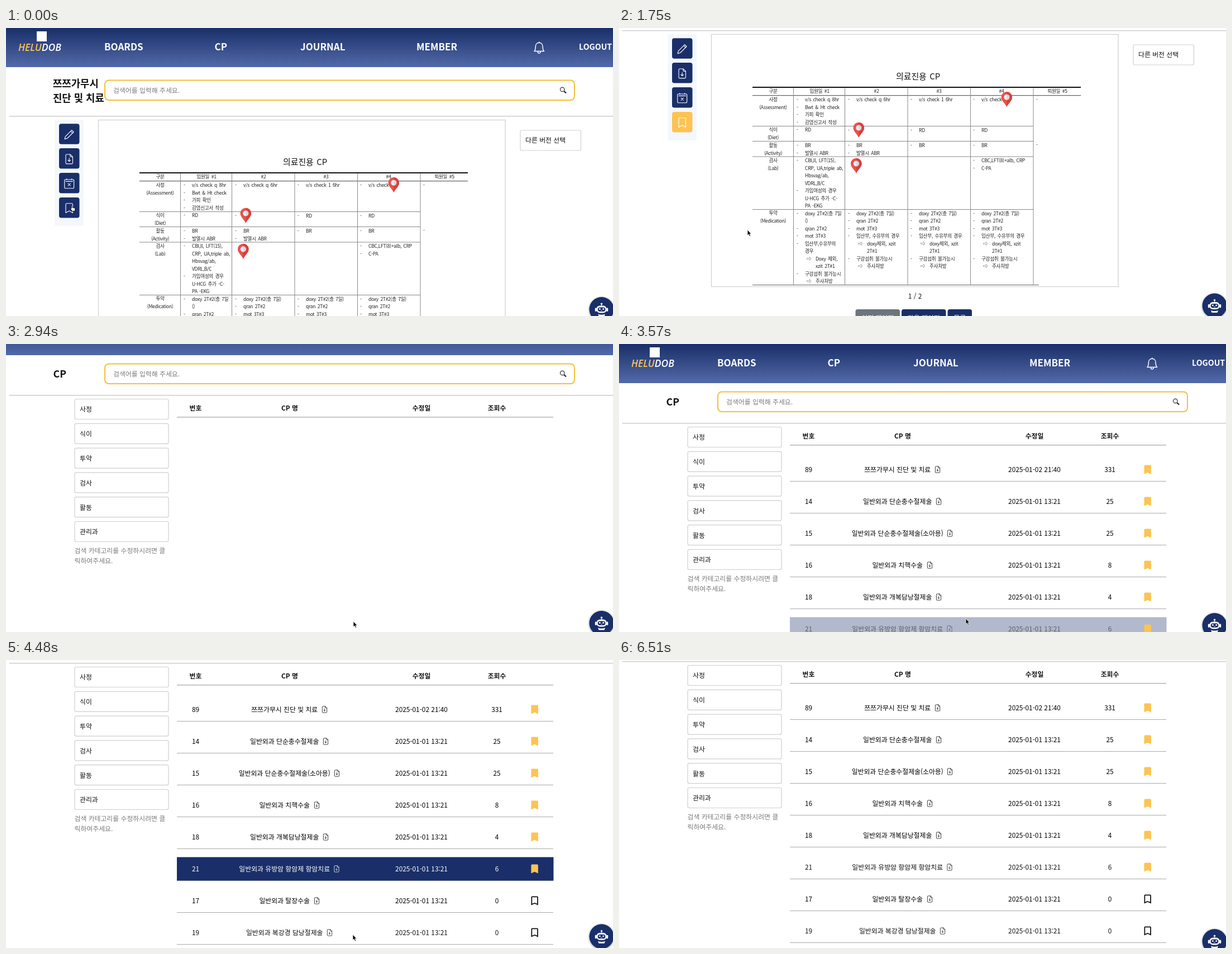
Animation, 1087 px wide and 515 px high, one loop 7 s. Source, as an HTML page:

```html
<!DOCTYPE html>
<html lang="ko">
<head>
<meta charset="utf-8">
<title>CP</title>
<style>
  html, body { margin: 0; width: 100%; height: 100%; overflow: hidden; background: #fff; }
  svg { display: block; width: 100vw; height: 100vh; }
  text { font-family: "Noto Sans CJK KR", "Noto Sans CJK", "Noto Sans CJK JP", sans-serif; font-feature-settings: "calt" 0; fill: #111; }
  .mid { text-anchor: middle; }
  .bold { font-weight: 700; }
  .med { font-weight: 500; }
  .white { fill: #fff; }
  .soft { fill: #7b7b7b; }
  .title { word-spacing: 1.2px; }
  .doc text { letter-spacing: -.038em; word-spacing: 1.5px; fill: #222; }
  .row text { fill: currentColor; }
  .icon { fill: none; stroke-linecap: round; stroke-linejoin: round; }
  .brand { font: italic 600 17.5px "Open Sans", sans-serif; }
  .box { fill: #fff; stroke: #cfcfcf; stroke-width: 1.2; }
  #bot { filter: drop-shadow(0 1px 2px #0006); }
</style>
</head>
<body>
<svg id="stage" viewBox="0 0 1087 515"></svg>
<script>
const NAVY = '#1a2f69', YELLOW = '#fdc353', SIZE = 11.86, SMALL = 8.6, STEP = 13.5;
const ICONS = {
  pencil: 'M.8 15.2 2 11 12 1l3 3L5 14zM10.3 2.7l3 3',
  file: 'M9.5.5H4A1.5 1.5 0 0 0 2.5 2v12A1.5 1.5 0 0 0 4 15.5h8a1.5 1.5 0 0 0 1.5-1.5V4.5zV3A1.5 1.5 0 0 0 11 4.5h2.5M8 6.5v5M6 9.7l2 2 2-2',
  calendar: 'M2 1.5h12A1.5 1.5 0 0 1 15.5 3v11a1.5 1.5 0 0 1-1.5 1.5H2A1.5 1.5 0 0 1 .5 14V3A1.5 1.5 0 0 1 2 1.5zM2.5 4.5h11M4 .3v1.5M12 .3v1.5M6.2 7.8l3.6 3.6M9.8 7.8l-3.6 3.6',
  bookmark: 'M2.5 15.3V2A1.5 1.5 0 0 1 4 .5h8A1.5 1.5 0 0 1 13.5 2v13.3L8 12.3z'
};

const text = (x, mid, s, cls = '', size = SIZE) =>
  `<text x="${x}" y="${mid + size * .37}" font-size="${size}" class="${cls}">${s.replace(/&/g, '&amp;')}</text>`;
const rect = (x, y, w, h, fill, r = 0, more = '') =>
  `<rect x="${x}" y="${y}" width="${w}" height="${h}" rx="${r}" fill="${fill}" ${more}/>`;
const box = (x, y, w, h, r = 3) => rect(x, y, w, h, '#fff', r, 'class="box"');
const line = (x1, y1, x2, y2, color, w = 1) =>
  `<path d="M${x1} ${y1}L${x2} ${y2}" stroke="${color}" stroke-width="${w}"/>`;
const icon = (name, x, y, size, color = '#fff') =>
  `<path class="icon" d="${ICONS[name]}" stroke="${color}" transform="translate(${x - size / 2} ${y - size / 2}) scale(${size / 16})"/>`;

function header() {
  return rect(0, 0, 1087, 70, 'url(#sky)') + rect(55, 6, 18, 18, '#fff') +
    `<text class="brand" x="22" y="41" style="fill:${YELLOW}">HELU<tspan fill="#fff">DOB</tspan></text>` +
    [[176, 'BOARDS'], [373.5, 'CP'], [527, 'JOURNAL'], [735, 'MEMBER']]
      .map(([x, s]) => text(x, 34, s, 'bold white', 17)).join('') +
    text(1026, 34, 'LOGOUT', 'bold white', 14.2) +
    '<path class="icon" stroke="#fff" stroke-width="1.5" d="M946 41.5c2-2 2.3-4 2.3-8 0-4.5 2.7-7.2 6.4-7.2s6.4 2.7 6.4 7.2c0 4 .3 6 2.5 8zM952.3 42.5a2.5 2.5 0 0 0 5 0M954.7 25v1"/>';
}

function search(y, ruleY) {
  const m = y + 17.7;
  return rect(177, y, 841, 35.5, '#fff', 7, 'stroke="#f4bf3a" stroke-width="2"') +
    text(192, m, '검색어를 입력해 주세요.', 'soft') +
    `<circle cx="996.3" cy="${m - 1.3}" r="3.8" fill="#eef2f4" stroke="#333" stroke-width="1.2"/>` +
    line(999.3, m + 1.8, 1003, m + 5.2, '#222', 2.2) + line(6, ruleY, 1087, ruleY, '#cdcdcd', 1.4);
}

// A leading "-" sets a bullet, ">" an arrow, "_" the arrow's indent.
function cell(x, y, lines) {
  return lines.map((s, i) => {
    const put = (dx, str) => text(x + dx, y + i * STEP, str, '', SMALL);
    const rest = s.slice(1);
    if (s[0] === '-') return put(-15, '-') + put(0, rest);
    if (s[0] === '>') return put(3, '⇨') + put(19, rest);
    return s[0] === '_' ? put(19, rest) : put(0, s);
  }).join('');
}

const pin = (x, y) => `<g transform="translate(${x} ${y})">
  <path d="M0 0C-1.8-5.5-9.8-11-9.8-17.6a9.8 9.6 0 0 1 19.6 0C9.8-11 1.8-5.5 0 0z" fill="#ec504b"/>
  <path d="M0 0C1.8-5.5 9.8-11 9.8-17.6A9.8 9.6 0 0 0 0-27.2z" fill="#d9403d"/>
  <circle cy="-17.5" r="5" fill="#f1f1f1"/><path d="M0-22.5a5 5 0 0 1 0 10z" fill="#d3dbe0"/></g>`;

function chart() {
  const heads = [[276, '구분'], [359, '입원일 #1'], [461, '#2'], [573, '#3'], [685, '#4'], [785, '퇴원일 #5']];
  const labels = [[281.3, '사정', '(Assessment)'], [335.3, '식이', '(Diet)'], [363, '활동', '(Activity)'],
    [390.3, '검사', '(Lab)'], [484.3, '투약', '(Medication)']];
  const dose = ['-doxy 2T#2(총 7일)', '-qran 2T#2', '-mot 3T#3', '-임산부, 수유부의 경우', '>doxy제외, xzit',
    '_2T#1', '-구강섭취 불가능시', '>주사처방'];
  const checks = ['-v/s check q 6hr', '-v/s check 1 6hr', '-v/s check'];
  return text(496, 239, '의료진용 CP', 'title', 14.9) + '<g class="doc">' +
    heads.map(([x, s]) => text(x, 266.3, s, 'mid', SMALL)).join('') +
    labels.map(([y, a, b]) => text(276, y, a, 'mid', SMALL) + text(276, y + 13.7, b, 'mid', SMALL)).join('') +
    [328.5, 355.5, 383, 477.5].map(y => line(239, y, 742, y, '#888')).join('') +
    line(239, 612.5, 752, 612.5, '#666', 1.2) + line(239, 273.7, 827, 273.7, '#666', 1.3) +
    [312.5, 404.5, 517, 629.5, 742].map(x => line(x, 259, x, 612.5, '#888')).join('') +
    line(239, 259, 827, 259, '#111', 2) +
    cell(333, 281.3, ['-v/s check q 8hr', '-Bwt & Ht check', '-가피 확인', '-감염신고서 작성', '-RD']) +
    cell(333, 363, ['-BR', '-발열시 ABR', '-CBI,II, LFT(15),', 'CRP, UA,triple ab,', 'Hbsvag/ab,', 'VDRL,B/C',
      '-가임여성의 경우', 'U-HCG 추가 -C-', 'PA -EKG', '-doxy 2T#2(총 7일', '()', '-qran 2T#2', '-mot 3T#3',
      '-임산부,수유부의', '경우', '>Doxy 제외,', '_xzit 2T#1', '-구강섭취 불가능시', '>주사처방']) +
    [425, 537, 649].map((x, i) => cell(x, 281.3, [checks[i]]) +
      cell(x, 335.7, [i ? '-RD' : '-']) + cell(x, 363, ['-BR']) + cell(x, 484.6, dose)).join('') +
    cell(425, 376.5, ['-발열시 ABR']) + cell(649, 390.3, ['-CBC,LFT(8)+alb, CRP', '-C-PA']) +
    cell(762, 281.3, ['-']) + cell(762, 362, ['-']) +
    pin(694.3, 294.3) + pin(429.3, 349) + pin(424.8, 413) + '</g>';
}

function detailPage() {
  const tools = ['pencil', 'file', 'calendar', 'bookmark'];
  const buttons = [[423.5, 79.5, '이전 페이지', '#6c757d'], [506, 79.5, '다음 페이지', NAVY], [588.5, 43.5, '목록', NAVY]];
  return header() + text(84, 99, '쯔쯔가무시', 'bold', 17.8) + text(84, 125, '진단 및 치료', 'bold', 17.8) +
    search(93.5, 157.7) + rect(87.5, 164, 51.5, 190, '#f4f8fc') +
    tools.map((n, i) => rect(95, 171.2 + i * 43.9, 36.5, 36.5, NAVY, 4, `id="${n}"`) +
      icon(n, 113.2, 190.5 + i * 43.9, 18)).join('') +
    box(165.5, 164.5, 728.5, 451, 0) + chart() +
    box(921, 183, 108.5, 36) + text(930, 201, '다른 버전 선택', 'med') +
    text(530, 633, '1 / 2', 'mid') +
    buttons.map(([x, w, s, c]) => rect(x, 656, w, 33, c, 4) + text(x + w / 2, 672, s, 'mid med white')).join('');
}

const ROWS = [
  ['89', '쯔쯔가무시 진단 및 치료', 570.5, '331'], ['14', '일반외과 단순충수절제술', 572.5, '25'],
  ['15', '일반외과 단순충수절제술(소아용)', 592.5, '25'], ['16', '일반외과 치핵수술', 556.5, '8'],
  ['18', '일반외과 개복담낭절제술', 572.5, '4'], ['21', '일반외과 유방암 항암제 항암치료', 592, '6'],
  ['17', '일반외과 탈장수술', 556.5, '0'], ['19', '일반외과 복강경 담낭절제술', 579.5, '0']
];

function row([no, name, iconX, views], i) {
  const y = 224.5 + i * 57, saved = i < 6;
  return `<g class="row">${line(306, y + 21, 980, y + 21, '#aaa', 1.2)}` +
    rect(306, y - 21, 674.5, 42, NAVY, 0, 'opacity="0"') +
    text(339.5, y, no, 'mid') + text(498.7, y, name, 'mid') + icon('file', iconX, y, 12, 'currentColor') +
    text(744, y, i ? '2025-01-01 13:21' : '2025-01-02 21:40', 'mid') + text(879, y, views, 'mid') +
    `<path transform="translate(936 ${y - 10.7}) scale(.89)" fill="${saved ? YELLOW : '#111'}" d="M17 3H7c-1.1 0-2 .9-2 2v16l7-3 7 3V5c0-1.1-.9-2-2-2z${saved ? '' : 'm0 15-5-2.18L7 18V5h10z'}"/></g>`;
}

function listPage() {
  return header() + text(84.5, 103.8, 'CP', 'bold', 17.8) + search(85.5, 141.8) +
    ['사정', '식이', '투약', '검사', '활동', '관리과'].map((s, i) =>
      box(123, 148.5 + i * 43.8, 168, 36) + text(132, 167 + i * 43.8, s, 'med')).join('') +
    text(122.5, 420, '검색 카테고리를 수정하시려면 클', 'soft') + text(122.5, 437.5, '릭하여주세요.', 'soft') +
    [[339.5, '번호'], [508, 'CP 명'], [744, '수정일'], [879, '조회수']]
      .map(([x, s]) => text(x, 165, s, 'mid bold')).join('') +
    line(306, 180.7, 980, 180.7, '#b5b5b5', 1.4) + `<g id="rows">${ROWS.map(row).join('')}</g>`;
}

const bot = `<g id="bot"><circle cx="1066.5" cy="503" r="22" fill="${NAVY}"/>
  <g fill="#fff"><circle cx="1066.5" cy="493.3" r="1.7"/><path d="M1066 494h1v4h-1z"/>
  <rect x="1054.8" y="500.5" width="3" height="6.5" rx="1.4"/><rect x="1075.2" y="500.5" width="3" height="6.5" rx="1.4"/>
  <rect x="1057.5" y="496.5" width="18" height="13" rx="6"/><path d="M1060 511.5q6.5 2.5 13 0l-1.5 4h-10z"/></g>
  <rect x="1059.7" y="499.5" width="13.6" height="7.5" rx="3.7" fill="${NAVY}"/>
  <circle cx="1063.3" cy="502.5" r="1.4" fill="#fff"/><circle cx="1069.7" cy="502.5" r="1.4" fill="#fff"/>
  <path d="M1065 504.8q1.5 1.2 3 0" fill="none" stroke="#fff" stroke-width=".8"/></g>`;

const pointer = `<g id="pointer">
  <path id="arrow" d="M0 0V9.8L2.2 7.9 3.9 11.6 5.6 10.8 4 7.2H6.9z" fill="#000" stroke="#fff" stroke-width=".8"/>
  <path id="hand" d="M1 .6C1.5-.2 2.6 0 2.7 1V4l3.8.8q1.5.4 1.3 2L7.2 10.5H2.7L-.6 6.6q-.3-1.3 1.6-.5z" fill="#fff" stroke="#000" stroke-width=".8"/></g>`;

const stage = document.getElementById('stage');
stage.innerHTML = `<defs><linearGradient id="sky" x2="0" y2="1"><stop stop-color="${NAVY}"/><stop offset="1" stop-color="#526aa9"/></linearGradient></defs>
  <g id="detail">${detailPage()}</g><g id="list">${listPage()}</g>${bot}${pointer}`;

const [detail, list, rows, botEl, cursor, arrow, hand, mark] =
  ['detail', 'list', 'rows', 'bot', 'pointer', 'arrow', 'hand', 'bookmark'].map(id => document.getElementById(id));

// Each track holds [time, value, ...] points.
const SCROLL = [[1190, 0], [1260, 22], [1330, 56], [1470, 104], [1610, 135], [1750, 153], [1960, 169],
  [2730, 169], [2800, 124], [2870, 84], [2940, 50], [3080, 14], [3220, 0],
  [3780, 0], [3850, 9], [3920, 25], [4060, 67], [4200, 101], [4340, 124], [4480, 136], [4550, 139]];
const FLOAT = [[1190, 0], [1330, -4.5], [1750, -6.5], [1960, -7], [2730, -7], [2940, -4], [3290, 0],
  [3780, 0], [4060, -11], [4340, -11], [4760, -4], [5180, 0]];
const POINTER = [[910, 116, 317], [980, 150, 332], [1050, 205, 353], [1120, 230, 361], [1960, 230, 361],
  [2100, 258, 374], [2380, 500, 455], [2590, 610, 491], [2730, 622, 496],
  [3220, 622, 496], [3290, 621, 491], [6090, 621, 491], [6160, 622, 500], [6230, 625, 530]];
const MARK = [[420, 0], [700, 1]];
const HOVER = { 5: [[3500, 0], [3710, 1], [4550, 1], [4830, 0]], 7: [[4550, 0], [4830, 1], [6160, 1], [6440, 0]] };

function at(track, t) {
  const i = track.findIndex(p => p[0] > t);
  if (i === 0) return track[0].slice(1);
  if (i < 0) return track[track.length - 1].slice(1);
  const a = track[i - 1], b = track[i], k = (t - a[0]) / (b[0] - a[0]);
  return a.slice(1).map((v, j) => v + (b[j + 1] - v) * k);
}
const mix = (a, b, k) => `rgb(${a.map((v, i) => Math.round(v + (b[i] - v) * k))})`;
const show = (node, on) => { node.style.display = on ? '' : 'none'; };

function draw(time) {
  const t = Math.floor(time % 7000 / 70) * 70;
  const onList = t >= 2800, overLink = t < 980 || (t >= 2590 && t < 2800);
  const shift = `translate(0 ${-at(SCROLL, t)[0]})`;
  detail.setAttribute('transform', shift);
  list.setAttribute('transform', shift);
  show(detail, !onList);
  show(list, onList);
  show(rows, t >= 3570);
  for (const i in HOVER) {
    const k = at(HOVER[i], t)[0], g = rows.children[i];
    g.style.color = mix([17, 17, 17], [255, 255, 255], k);
    g.querySelector('rect').setAttribute('opacity', k);
  }
  mark.setAttribute('fill', mix([26, 47, 105], [253, 195, 83], at(MARK, t)[0]));
  botEl.setAttribute('transform', `translate(0 ${at(FLOAT, t)[0]})`);
  cursor.setAttribute('transform', `translate(${at(POINTER, t)})`);
  show(arrow, !overLink);
  show(hand, overLink);
}

const start = performance.now();
function frame() {
  draw(performance.now() - start);
  requestAnimationFrame(frame);
}
frame();
</script>
</body>
</html>
```
